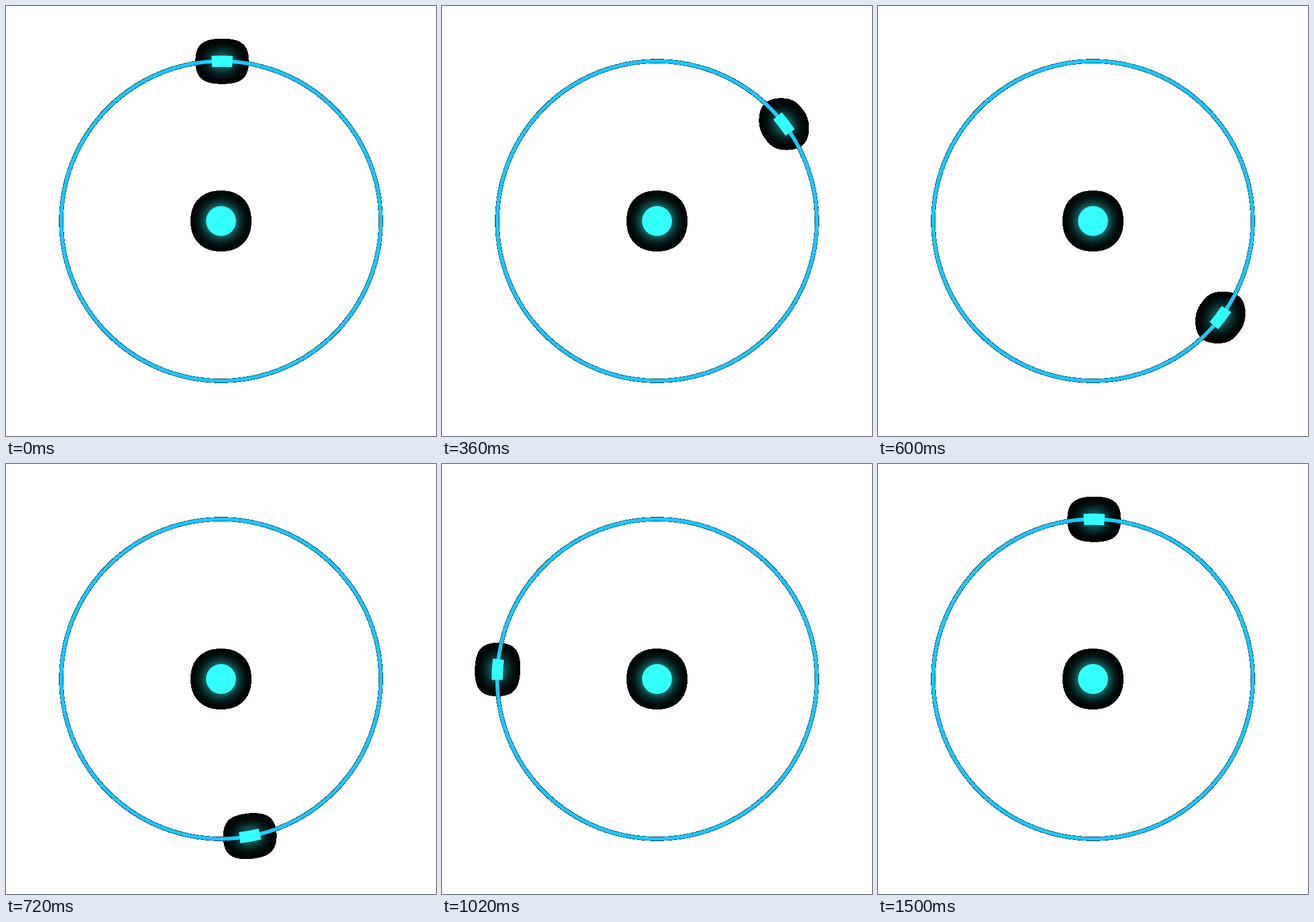
Write an HTML page with a canvas that moves like this. It is 748 px wide and 748 px high and loops after 1530 ms.

```html
<!DOCTYPE html>
<html lang="en">
<head>
<meta charset="utf-8">
<title>Orbit loader</title>
<style>
  html, body { margin: 0; width: 100%; height: 100%; overflow: hidden; background: #fff; }
  canvas { display: block; }
</style>
</head>
<body>
<canvas id="stage" width="748" height="748"></canvas>
<script>
const SIZE = 748, MID = SIZE / 2, ORBIT = 278;
const PATCH = 128, HALF = PATCH / 2;
const BLUE = '#1ac6ff', CYAN = [51, 255, 255];
const TICK = 30, STEPS = 50, LOOP = TICK * (STEPS + 1);
const TAU = Math.PI * 2, RAD = Math.PI / 180;

const context = canvas => canvas.getContext('2d', { willReadFrequently: true });
const stage = context(document.getElementById('stage'));

function makePatch() {
  const canvas = document.createElement('canvas');
  canvas.width = canvas.height = PATCH;
  return context(canvas);
}
const art = makePatch(), glow = makePatch();

// Kernel of three box blurs in a row
function boxKernel(width) {
  let kernel = [1];
  for (let pass = 0; pass < 3; pass++) {
    const next = new Array(kernel.length + width - 1).fill(0);
    kernel.forEach((v, i) => {
      for (let j = 0; j < width; j++) next[i + j] += v / width;
    });
    kernel = next;
  }
  return kernel;
}
const kernel = boxKernel(25), reach = (kernel.length - 1) / 2;

// Blurs along one axis; the result is transposed, so two calls blur both
function blur(src) {
  const out = new Float32Array(PATCH * PATCH);
  for (let y = 0; y < PATCH; y++) {
    for (let x = 0; x < PATCH; x++) {
      const v = src[y * PATCH + x];
      if (!v) continue;
      const from = Math.max(0, x - reach), to = Math.min(PATCH - 1, x + reach);
      for (let i = from; i <= to; i++) out[i * PATCH + y] += v * kernel[i - x + reach];
    }
  }
  return out;
}

// Makes every touched pixel opaque, mixed with black
function flatten(image) {
  const d = image.data;
  for (let i = 0; i < d.length; i += 4) {
    const a = d[i + 3];
    if (!a) continue;
    for (let c = 0; c < 3; c++) d[i + c] = d[i + c] * a / 255;
    d[i + 3] = 255;
  }
  return image;
}

function ring(g) {
  g.strokeStyle = BLUE;
  g.lineWidth = 6.5;
  g.beginPath();
  g.arc(MID, MID, ORBIT, 0, TAU);
  g.stroke();
}

function ball(g) {
  g.fillStyle = `rgb(${CYAN})`;
  g.beginPath();
  g.arc(MID, MID, 26, 0, TAU);
  g.fill();
}

function block(angle) {
  const half = 18 / ORBIT;
  return g => {
    g.strokeStyle = `rgb(${CYAN})`;
    g.lineWidth = 19.5;
    g.beginPath();
    g.arc(MID, MID, ORBIT, angle - half, angle + half);
    g.stroke();
  };
}

function clearArt(left, top) {
  art.setTransform(1, 0, 0, 1, 0, 0);
  art.clearRect(0, 0, PATCH, PATCH);
  art.translate(-left, -top);
}

function drawGlowing(shape, cx, cy, cut) {
  const left = Math.round(cx) - HALF, top = Math.round(cy) - HALF;
  clearArt(left, top);
  shape(art);
  const image = art.getImageData(0, 0, PATCH, PATCH), d = image.data;
  const mask = new Float32Array(PATCH * PATCH);
  for (let i = 0; i < mask.length; i++) mask[i] = d[i * 4 + 3] / 255;

  blur(blur(mask)).forEach((v, i) => {
    d.set(CYAN, i * 4);
    d[i * 4 + 3] = v > cut ? Math.ceil(v * 255) : 0;
  });
  glow.putImageData(image, 0, 0);

  clearArt(left, top);
  ring(art);
  art.drawImage(glow.canvas, left, top);
  shape(art);
  stage.putImageData(flatten(art.getImageData(0, 0, PATCH, PATCH)), left, top);
}

ring(stage);
stage.putImageData(flatten(stage.getImageData(0, 0, SIZE, SIZE)), 0, 0);
drawGlowing(ball, MID, MID, 0.0066);
const base = stage.getImageData(0, 0, SIZE, SIZE);

let shown = -1;
function render(now) {
  const step = Math.floor((now % LOOP) / TICK);
  if (step !== shown) {
    shown = step;
    const t = step / STEPS;
    const turn = t * t * (3 - 2 * t);
    const angle = (turn * 360 - 89.6) * RAD;
    stage.putImageData(base, 0, 0);
    drawGlowing(block(angle), MID + ORBIT * Math.cos(angle), MID + ORBIT * Math.sin(angle), 0.0041);
  }
}

const start = performance.now();
function loop() {
  render(performance.now() - start);
  requestAnimationFrame(loop);
}
loop();
</script>
</body>
</html>
```
